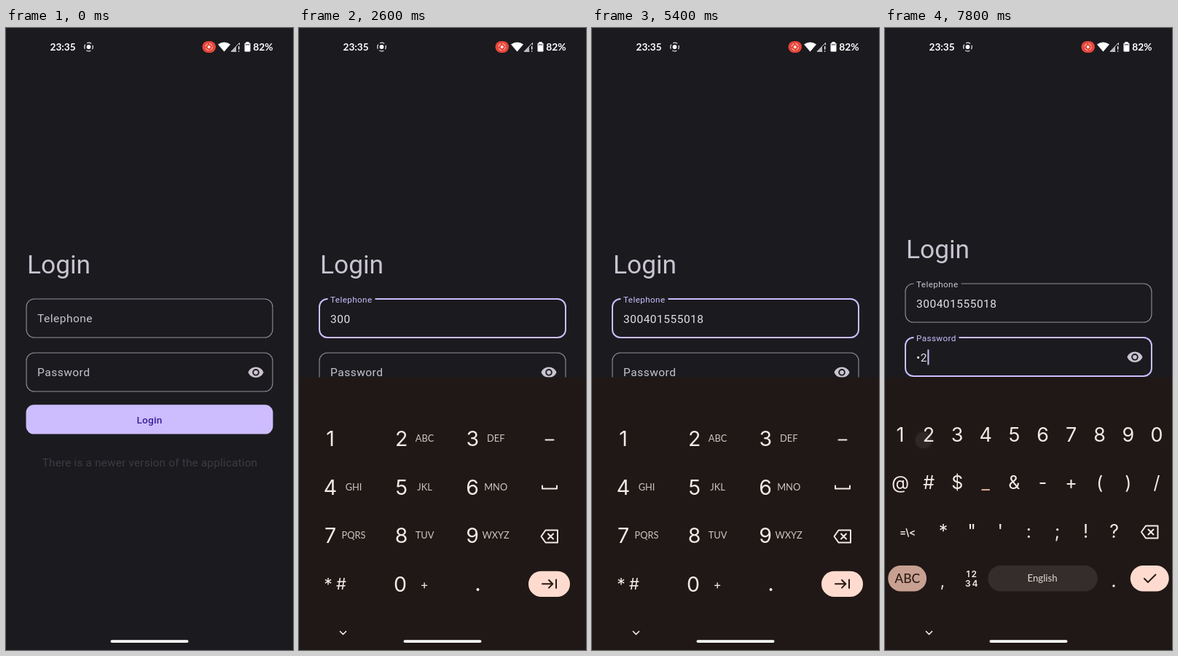
An HTML page for the animation above (8000 ms loop, 394x854 px).

```html
<!DOCTYPE html>
<html lang="en">
<head>
<meta charset="utf-8">
<title>Login form</title>
<style>
  html, body { margin: 0; width: 100%; height: 100%; overflow: hidden; background: #1b1b1f; }
  svg { display: block; width: 100%; height: 100%; font-family: Roboto, sans-serif; }
  .key { font-family: Inter, sans-serif; }
  .label { font-family: Lato, sans-serif; }
  .mid { text-anchor: middle; }
  .line { fill: none; stroke-linecap: round; stroke-linejoin: round; }
</style>
</head>
<body>
<svg id="stage" viewBox="0 0 394 854"></svg>
<script>
const LOOP = 8000;
const BACK = '#1b1b1f', BOARD = '#201816', MUTED = '#c9c4d0', ACCENT = '#cdbdff';
const INK = '#f5e9e5', PEACH = '#ffdbcf', TAN = '#c8a092', DARK = '#2b1a14';
const PHONE = '300401555018', SAVED_PHONE = '555014827';
const DIGIT_WIDTH = 9.2, BULLET_WIDTH = 5.8;

// Each step holds until the next; "typed" counts digits of the phone number.
const steps = [
  { at: 0, notice: true },
  { at: 200 },
  { at: 1000, focus: 'phone', dot: [185, 400] },
  { at: 1200, focus: 'phone', board: 'keypad', chip: true, caret: true },
  { at: 1400, focus: 'phone', board: 'keypad', chip: true, dot: [256, 589] },
  { at: 2000, focus: 'phone', board: 'keypad', typed: 1, caret: true },
  { at: 2200, focus: 'phone', board: 'keypad', typed: 1, caret: true, dot: [146, 762] },
  { at: 2400, focus: 'phone', board: 'keypad', typed: 2, caret: true, dot: [146, 762] },
  { at: 2600, focus: 'phone', board: 'keypad', typed: 3 },
  { at: 3000, focus: 'phone', board: 'keypad', typed: 3, caret: true },
  { at: 3400, focus: 'phone', board: 'keypad', typed: 4, caret: true, dot: [48, 632] },
  { at: 3600, focus: 'phone', board: 'keypad', typed: 4, caret: true, dot: [148, 758] },
  { at: 3800, focus: 'phone', board: 'keypad', typed: 5, caret: true },
  { at: 4000, focus: 'phone', board: 'keypad', typed: 5, caret: true, dot: [39, 552] },
  { at: 4400, focus: 'phone', board: 'keypad', typed: 6, caret: true },
  { at: 4600, focus: 'phone', board: 'keypad', typed: 7, caret: true, dot: [148, 628] },
  { at: 4800, focus: 'phone', board: 'keypad', typed: 8, caret: true, dot: [148, 628] },
  { at: 5000, focus: 'phone', board: 'keypad', typed: 9, caret: true, dot: [148, 628] },
  { at: 5200, focus: 'phone', board: 'keypad', typed: 11, caret: true, dot: [148, 694] },
  { at: 5400, focus: 'phone', board: 'keypad', typed: 12 },
  { at: 5800, focus: 'phone', board: 'keypad', typed: 12, caret: true, dot: [180, 465] },
  { at: 6000, focus: 'password', board: 'letters', typed: 12, caret: true },
  { at: 6200, focus: 'password', board: 'letters', typed: 12 },
  { at: 6400, focus: 'password', board: 'letters', typed: 12, chip: true, caret: true },
  { at: 6800, focus: 'password', board: 'letters', typed: 12, chip: true, dot: [32, 756] },
  { at: 7000, focus: 'password', board: 'symbols', typed: 12, chip: true, caret: true },
  { at: 7200, focus: 'password', board: 'symbols', typed: 12, chip: true, dot: [26, 562] },
  { at: 7400, focus: 'password', board: 'symbols', typed: 12, secret: '1', caret: true },
  { at: 7600, focus: 'password', board: 'symbols', typed: 12, secret: '•', caret: true, dot: [53, 566] },
  { at: 7800, focus: 'password', board: 'symbols', typed: 12, secret: '•2', caret: true, dot: [53, 566, .1] },
];

const escapeText = s => s.replace(/&/g, '&amp;').replace(/</g, '&lt;');
const text = (x, y, s, size, fill, extra = '') =>
  `<text x="${x}" y="${y}" font-size="${size}" fill="${fill}" ${extra}>${escapeText(s)}</text>`;
const key = (x, y, s, size = 28.5, fill = INK, extra = '') =>
  text(x, y, s, size, fill, `class="key mid" ${extra}`);
const label = (x, y, s, size, fill, extra = '') =>
  text(x, y, s, size, fill, `class="label mid" ${extra}`);
const box = (x, y, w, h, r, fill, extra = '') =>
  `<rect x="${x}" y="${y}" width="${w}" height="${h}" rx="${r}" fill="${fill}" ${extra}/>`;
const line = (d, stroke = INK, width = 2) =>
  `<path class="line" d="${d}" stroke="${stroke}" stroke-width="${width}"/>`;
const circle = (x, y, r, fill, extra = '') =>
  `<circle cx="${x}" cy="${y}" r="${r}" fill="${fill}" ${extra}/>`;
const row = (chars, x, y, size) =>
  [...chars].map((c, i) => key(x + i * 39.1, y, c, size, c === '_' ? '#dba898' : INK)).join('');

const defs = `<defs><radialGradient id="touch">
  <stop offset="0" stop-color="#a8a3a5"/><stop offset=".5" stop-color="#b4b0b4"/>
  <stop offset=".6" stop-color="#cac7d0"/><stop offset=".65" stop-color="#b5b2bd"/>
  <stop offset=".72" stop-color="#55525e" stop-opacity=".8"/>
  <stop offset="1" stop-color="#45424c" stop-opacity="0"/></radialGradient></defs>`;

const statusBar =
  text(60.5, 30.5, '23:35', 13.6, '#fff', 'class="label" font-weight="700"') +
  circle(113.5, 26, 5.8, 'none', 'stroke="#ddd" stroke-width="1.3" stroke-dasharray="6.4 2.7" stroke-dashoffset="3.2"') +
  circle(113.5, 26, 2.9, '#fff') +
  box(269.5, 18, 18.5, 16, 8, '#e8453a') +
  circle(278.7, 26, 4.7, 'none', 'stroke="#ffd0c8" stroke-width="1" stroke-dasharray="5.2 2.2"') +
  circle(278.7, 26, 2, '#ffe4df') +
  '<path d="M291 22.5Q299.500 16.500 308 22.500L299.500 32.500Z" fill="#fff"/>' +
  '<path d="M309 32.500L316 25.500V32.500Z" fill="#b8b8bc"/>' +
  line('M309.500 32H316M309.500 32L320.500 20.500V23', '#ddd', 1) +
  line('M319.700 25.500V29M319.700 31.800V32', '#fff', 1.4) +
  box(327.5, 20.5, 8, 12, 1.3, '#fff') + box(329.5, 19, 4, 2, .5, '#fff') +
  box(328.7, 22, 5.6, 1.6, 0, '#77777b') +
  text(339.2, 30.5, '82%', 13.8, '#fff', 'class="label" font-weight="700"');

const eye = y => `<path transform="translate(331.500 ${y}) scale(.96)" fill="${MUTED}" d="M12 4.5C7 4.500 2.730 7.610 1 12c1.730 4.390 6 7.500 11 7.500s9.270-3.110 11-7.500c-1.730-4.390-6-7.500-11-7.500zM12 17a5 5 0 1 1 0-10a5 5 0 0 1 0 10zm0-8a3 3 0 1 0 0 6a3 3 0 0 0 0-6z"/>`;

function field(y, name, notch, value, focused, caret) {
  const floating = focused || value;
  let out = box(28, y, 338, 53, 11, 'none',
    `stroke="${focused ? ACCENT : '#938f99'}" stroke-width="${focused ? 2 : 1.1}"`);
  if (floating) {
    out += box(39.5, y - 4, notch, 8, 0, BACK) +
      text(43, y + 5, name, 11.7, focused ? ACCENT : MUTED, 'letter-spacing=".4"');
  } else {
    out += text(43, y + 32.3, name, 15.5, MUTED, 'letter-spacing=".5"');
  }
  out += text(43, y + 32.8, value, 15.5, '#e5e1e6', 'letter-spacing=".5"');
  if (focused && caret) {
    const width = [...value].reduce((sum, c) => sum + (c === '•' ? BULLET_WIDTH : DIGIT_WIDTH), 0);
    out += box(43.4 + width, y + 16.5, 2, 21, 0, ACCENT);
  }
  return out;
}

function form({ focus, typed = 0, secret = '', caret, notice }) {
  const shift = focus === 'password' ? -21 : 0;
  return text(29, 336.5 + shift, 'Login', 35.3, MUTED) +
    field(372 + shift, 'Telephone', 65, PHONE.slice(0, typed), focus === 'phone', caret) +
    field(446 + shift, 'Password', 62, secret, focus === 'password', caret) +
    eye(461.3 + shift) +
    box(27.5, 517.3 + shift, 339, 40.3, 11, ACCENT) +
    text(197, 543 + shift, 'Login', 13.6, '#381e9a', 'class="mid" font-weight="500" letter-spacing=".2"') +
    (notice ? text(197.5, 602, 'There is a newer version of the application', 15.3, '#3d3b42', 'class="mid" letter-spacing=".2"') : '');
}

const backspace = (x, y) =>
  line(`M${x - 11} ${y}l6 -8.500h16.500v17h-16.500zM${x - 1.5} ${y - 3.5}l7 7m0 -7l-7 7`);
const keyIcon = (x, y, fill) =>
  `<path transform="translate(${x} ${y})" fill="${fill}" fill-rule="evenodd" d="M1 -2.300A6 6 0 1 0 1 2.300H4V5.500H8.500V2.300H11V-2.300ZM-5 -2.200a2.200 2.200 0 1 1 0 4.400a2.200 2.200 0 1 1 0 -4.400z"/>`;
const chipBox = (x, w) =>
  box(x, 484.7, w, 32.5, 16.2, '#352d2b', 'stroke="#736965" stroke-width="1"');

const phoneChip = chipBox(117, 118.5) +
  circle(138, 501, 7.7, 'none', 'stroke="#2a7de1" stroke-width="1.7"') +
  circle(138, 498.8, 2.7, '#2a7de1') +
  '<path d="M132.500 506Q138 500.500 143.500 506Q138 511 132.500 506Z" fill="#2a7de1"/>' +
  text(153.7, 506, SAVED_PHONE, 13.7, '#f5eeeb') + keyIcon(371, 501, '#fff');

const passwordChip = chipBox(138.5, 117) +
  `<g transform="translate(160 501) scale(.84)">${keyIcon(0, 0, '#ffcbb9')}</g>` +
  text(175.5, 506, 'Passwords', 13.4, '#f5eeeb');

function keypad() {
  const letters = ['', 'ABC', 'DEF', 'GHI', 'JKL', 'MNO', 'PQRS', 'TUV', 'WXYZ'];
  const keys = letters.map((s, i) => {
    const x = 43 + i % 3 * 97.6, y = 574 + Math.floor(i / 3) * 66.5;
    return key(x, y, String(i + 1)) + label(x + 32, y - 5.8, s, 12.8, '#d0c4bf');
  }).join('');
  return keys + key(40, 772, '*', 23) + key(58, 770.5, '#', 22) +
    key(139, 773.5, '0') + key(172, 770, '+', 17) + circle(245.5, 771, 2, INK) +
    line('M338.500 565.500H349.500') + line('M334 628.500V632.500H354V628.500') +
    backspace(343.5, 698) + box(315, 745.7, 57, 35.3, 17.6, PEACH) +
    line('M334 763.300H348M343 758l5.300 5.300l-5.300 5.300M353 757.500V769', DARK);
}

const bottomRow = mode =>
  box(4.2, 738, 52.8, 35.5, 17.5, TAN) + label(30.7, 761.5, mode, 17.5, DARK, 'font-weight="500"') +
  key(79, 766.5, ',', 22) + box(141.3, 738, 150.5, 35.5, 17.7, '#352d2b') +
  label(216, 760, 'English', 13.2, '#e4d9d5') + circle(314, 766, 1.7, INK) +
  box(336.8, 738, 53, 35.5, 17.7, PEACH) + line('M356 756l5 5l10.500 -10.500', DARK);

const boards = {
  keypad: keypad(),
  letters: row('qwertyuiop', 21, 565, 27) + row('asdfghjkl', 41, 631, 27) +
    row('zxcvbnm', 80, 697.5, 27) +
    line('M31 682l-10 10h5.500v8h9v-8h5.500z') + backspace(363, 692) + bottomRow('?123') +
    circle(118.5, 755.7, 9, 'none', `stroke="${INK}" stroke-width="1.7"`) +
    `<ellipse cx="118.5" cy="755.7" rx="4" ry="9" fill="none" stroke="${INK}" stroke-width="1.7"/>` +
    line('M110.500 752.700H126.500M110.500 758.700H126.500', INK, 1.7),
  symbols: row('1234567890', 21, 567.5, 27) + row('@#$_&-+()/', 21, 633, 25) +
    key(31, 696.5, '=\\<', 13.5, INK, 'font-weight="600"') + row('*"\':;!?', 80, 700, 25) +
    backspace(363, 692) + bottomRow('ABC') +
    key(119.8, 753.5, '12', 12, INK, 'font-weight="600" letter-spacing="2"') +
    key(119.8, 767, '34', 12, INK, 'font-weight="600" letter-spacing="2"'),
};

function keyboard({ board, chip }) {
  if (!board) return '';
  const suggestion = board === 'keypad' ? phoneChip : passwordChip;
  return box(0, 479.5, 394, 375, 0, BOARD) + boards[board] + (chip ? suggestion : '') +
    line('M56.500 828.500l4 4l4 -4', INK, 1.7);
}

function draw(step) {
  const [x, y, opacity = 1] = step.dot || [];
  stage.innerHTML = defs + box(0, 0, 394, 854, 0, BACK) + statusBar + form(step) + keyboard(step) +
    (step.dot ? circle(x, y, 16, 'url(#touch)', `opacity="${opacity}"`) : '') +
    box(143.5, 840.2, 107, 3.8, 1.9, '#fff');
}

const stage = document.getElementById('stage');
let shown;
function tick() {
  const time = performance.now() % LOOP;
  const step = steps.findLast(s => s.at <= time);
  if (step !== shown) draw(shown = step);
  requestAnimationFrame(tick);
}
tick();
</script>
</body>
</html>
```
